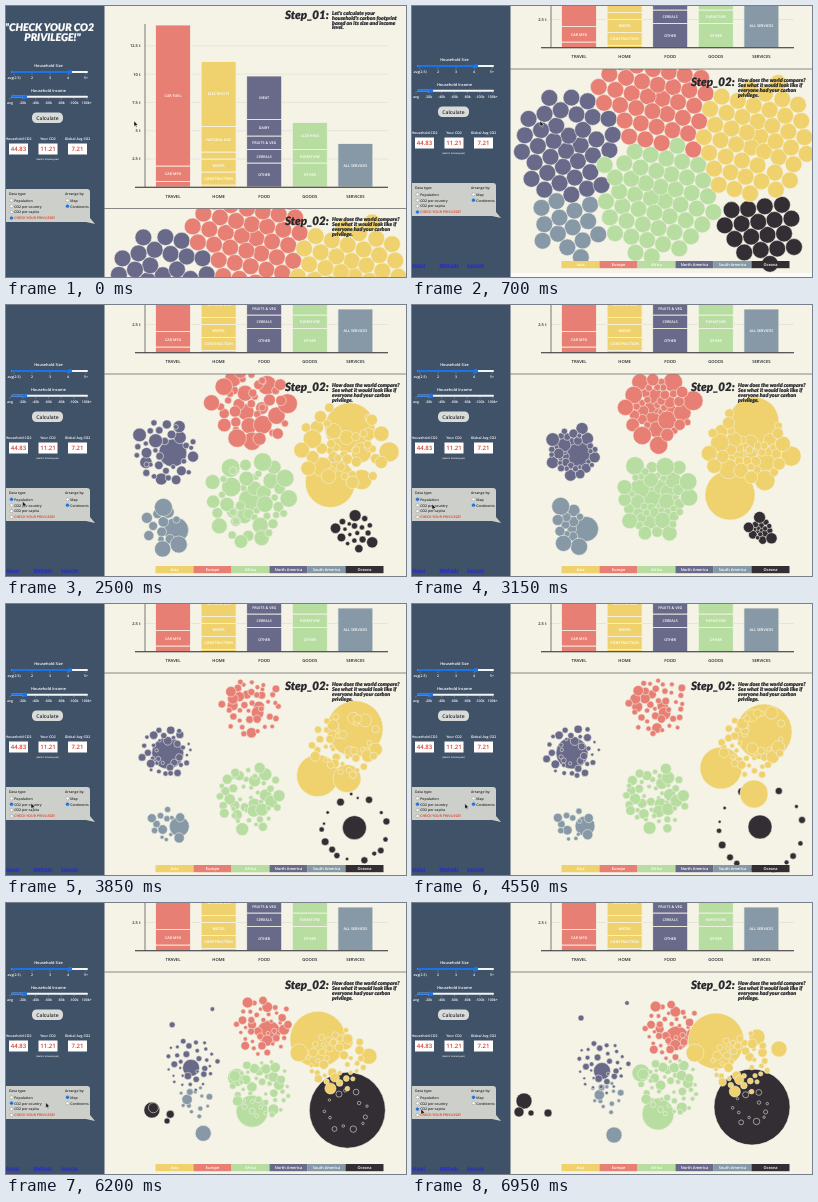
Recreate the animation shown at these times as an HTML page. Size 400 by 271 pixels, loop 7 s.

```html
<!DOCTYPE html>
<html lang="en">
<head>
<meta charset="utf-8">
<title>Carbon footprint explorer</title>
<style>
html, body { margin: 0; width: 100%; height: 100%; overflow: hidden; background: #fbfbf8; }
svg { display: block; width: 100vw; height: 100vh; }
text { font-family: "Open Sans", "Noto Sans", sans-serif; font-weight: 600; text-rendering: geometricPrecision; }
.brush { font-family: Lato, "Open Sans", sans-serif; font-weight: 900; font-style: italic; stroke: currentColor; stroke-width: .2; }
</style>
</head>
<body>
<svg id="stage" viewBox="0 0 400 271" preserveAspectRatio="none">
  <clipPath id="worldClip"><rect x="98" y="69" width="302" height="204"/></clipPath>
  <g id="page">
    <rect x="98" width="302" height="273" fill="#f4f3e6"/>
    <rect width="98.5" height="290" fill="#405268"/>
    <g id="side"></g>
    <g id="scroll">
      <g id="title" color="#fff"></g>
      <g id="chart" color="#26262c"></g>
      <g id="world" color="#26262c" transform="translate(0 133.5)">
        <g id="bubbles" clip-path="url(#worldClip)" stroke="#f4f3e6" stroke-width=".55"></g>
      </g>
    </g>
  </g>
  <path id="cursor" d="M0 0V5.4L1.3 4.3L2.2 6.2L3 5.8L2.2 4H4Z" fill="#111" stroke="#fff" stroke-width=".4"/>
</svg>
<script>
const LOOP = 7000, SCROLL = 133.5, BOUNCE = 6;
const YELLOW = '#efd26d', RED = '#e87f74', GREEN = '#b7dda1',
      PURPLE = '#69698a', SLATE = '#8799a7', BLACK = '#332d34',
      INK = '#26262c', BLUE = '#1a73e8', CREAM = '#f4f3e6';
const $ = id => document.getElementById(id);

function add(parent, tag, attrs, content) {
  const el = document.createElementNS('http://www.w3.org/2000/svg', tag);
  for (const k in attrs) el.setAttribute(k, attrs[k]);
  if (content !== undefined) el.textContent = content;
  parent.appendChild(el);
  return el;
}
const rect = (p, x, y, width, height, fill, more) => add(p, 'rect', { x, y, width, height, fill, ...more });
const dot = (p, cx, cy, r, fill, more) => add(p, 'circle', { cx, cy, r, fill, ...more });
const line = (p, x1, y1, x2, y2, stroke, w) => add(p, 'line', { x1, y1, x2, y2, stroke, 'stroke-width': w });
const text = (p, x, y, size, fill, str, more) =>
  add(p, 'text', { x, y, 'font-size': size, fill, 'text-anchor': 'middle', ...more }, str);
const LEFT = { 'text-anchor': 'start' }, BRUSH = { class: 'brush' };

// Sidebar
const side = $('side'), radios = {};

function slider(label, y, value, ticks, x0, gap) {
  text(side, 42.5, y, 3.9, '#fff', label);
  rect(side, 5, y + 3.7, 77, 2, '#f2f4f5', { rx: 1 });
  rect(side, 5, y + 3.7, value - 5, 2, BLUE, { rx: 1 });
  dot(side, value, y + 4.7, 2.2, BLUE);
  ticks.forEach((s, i) => {
    const x = x0 + i * gap;
    line(side, x, y + 6.2, x, y + 7.4, '#d5dae0', .4);
    text(side, x, y + 12, 3.5, '#fff', s);
  });
}
function radioList(x, y, options) {
  Object.entries(options).forEach(([key, label], i) => {
    const cy = y + i * 5.9;
    dot(side, x, cy, 1.6, '#fff', { stroke: '#777', 'stroke-width': .4 });
    radios[key] = dot(side, x, cy, 1.6, BLUE);
    text(side, x + 2.7, cy + 1.3, 3.5, key === 'privilege' ? '#e03a28' : INK, label, LEFT);
  });
}
function buildSide() {
  slider('Household Size', 61.3, 64, ['avg(2.5)', '2', '3', '4', '5+'], 8, 18);
  slider('Household Income', 86, 19, ['avg', '-20k', '-40k', '-60k', '-80k', '-100k', '100k+'], 4, 12.8);
  rect(side, 26, 106.5, 31, 10.5, '#d9dbd9', { rx: 4.5 });
  text(side, 41.5, 113.7, 5, INK, 'Calculate', { 'font-weight': 400 });
  [['Household CO2', '44.83'], ['Your CO2', '11.21'], ['Global Avg CO2', '7.21']].forEach(([label, value], i) => {
    const x = 12.5 + i * 29.5;
    text(side, x, 134.3, 3.5, '#fff', label);
    rect(side, x - 9.5, 137.5, 19, 11, '#fff');
    text(side, x, 145.3, 6, '#d8402f', value);
  });
  text(side, 41.5, 154, 2.3, '#fff', '(metric tonnes/year)');
  add(side, 'path', { fill: '#cdd0ca', d: 'M0 183H81Q84 183 84 186V212L89 218L80 216H0Z' });
  text(side, 3, 189.3, 3.5, INK, 'Data type:', LEFT);
  text(side, 59, 189.3, 3.5, INK, 'Arrange by:', LEFT);
  radioList(5.5, 194.3, {
    population: 'Population', country: 'CO2 per country', capita: 'CO2 per capita', privilege: 'CHECK YOUR PRIVILEGE!'
  });
  radioList(61.5, 194.3, { map: 'Map', continents: 'Continents' });
}

// Heading, bar chart, second section
function step(parent, y, name, lines) {
  text(parent, 279, y, 11.6, INK, name, { ...LEFT, ...BRUSH });
  lines.forEach((s, i) => text(parent, 326, y - 4.2 + i * 4.9, 5.3, INK, s, { ...LEFT, ...BRUSH }));
}
// Parts are heights from the baseline up
function bar(parent, x, name, fill, parts) {
  let y = 181;
  for (const [label, h] of parts) {
    y -= h;
    rect(parent, x, y, 35, h, fill, { stroke: CREAM, 'stroke-width': .8 });
    text(parent, x + 17.5, y + h / 2 + 1.4, 3.7, '#fff', label);
  }
  text(parent, x + 17.5, 191.8, 4.2, INK, name);
}
function buildMain() {
  const title = $('title'), chart = $('chart'), world = $('world');
  text(title, 43.5, 25.5, 10.5, '#fff', '"CHECK YOUR CO2', BRUSH);
  text(title, 46.5, 35, 10.5, '#fff', 'PRIVILEGE!"', BRUSH);

  for (let i = 1; i <= 5; i++) {
    const y = 181.3 - i * 28.3;
    line(chart, 139, y, 382, y, '#d4d4cb', .5);
    text(chart, 134.5, y + 1.5, 4, INK, i * 2.5 + ' t', { 'text-anchor': 'end' });
  }
  line(chart, 139, 18, 139, 181, INK, .6);
  [
    ['TRAVEL', RED, [['', 5.5], ['CAR MFG', 15.5], ['CAR FUEL', 141]]],
    ['HOME', YELLOW, [['', 2], ['CONSTRUCTION', 13], ['WATER', 13], ['', 7], ['NATURAL GAS', 25.5], ['ELECTRICITY', 65]]],
    ['FOOD', PURPLE, [['OTHER', 24], ['CEREALS', 13.5], ['FRUITS & VEG', 13.5], ['DAIRY', 16.5], ['MEAT', 43.5]]],
    ['GOODS', GREEN, [['OTHER', 24], ['FURNITURE', 13.5], ['CLOTHING', 27]]],
    ['SERVICES', SLATE, [['ALL SERVICES', 43.5]]]
  ].forEach(([name, fill, parts], i) => bar(chart, 149.5 + i * 45.6, name, fill, parts));
  line(chart, 129, 181.2, 382, 181.2, INK, 1.1);
  step(chart, 13, 'Step_01:', ["Let's calculate your", "household's carbon footprint", 'based on its size and income', 'level.']);

  line(world, 98, 69, 400, 69, '#6a6c70', .8);
  step(world, 86, 'Step_02:', ['How does the world compare?', 'See what it would look like if', 'everyone had your carbon', 'privilege.']);
  Object.entries({ Asia: YELLOW, Europe: RED, Africa: GREEN, 'North America': PURPLE, 'South America': SLATE, Oceana: BLACK })
    .forEach(([name, fill], i) => {
      rect(world, 149.5 + i * 38, 261, 38, 7.2, fill);
      text(world, 168.5 + i * 38, 266, 3.9, '#fff', name);
    });
  ['About', 'Methods', 'Sources'].forEach((s, i) =>
    text(world, i * 27.5, 266.5, 4.5, '#1c22e6', s, { ...LEFT, 'text-decoration': 'underline' }));
}

// Bubbles: n countries around a centre; size is the largest common radius,
// hubs are the few outstanding circles [x, y, r] of a layout
const groups = [
  { fill: BLACK, n: 18, size: 6, home: [349, 225], map: [340, 204], orbit: 42, hubs: {
    country: [[348, 223, 12]],
    map: [[340, 204, 38], [112, 198, 8], [107, 209, 5], [119, 210, 3], [136, 210, 4]] } },
  { fill: SLATE, n: 14, size: 9, home: [160, 222], map: [194, 193], hubs: {
    population: [[174, 224, 12.5]], country: [[173, 222, 10]], map: [[202, 232, 8]] } },
  { fill: PURPLE, n: 36, size: 7, home: [161, 148], map: [190, 163], hubs: {
    population: [[166, 149, 14]], country: [[160, 149, 16]], map: [[190, 168, 8.5], [169, 115, 3], [215, 100, 2.3]] } },
  { fill: GREEN, n: 47, size: 10, home: [243, 194], map: [258, 184], hubs: {
    population: [[241, 193, 12]], map: [[246, 211, 16], [229, 170, 9]] } },
  { fill: RED, n: 42, size: 10, home: [246, 102], map: [259, 128], hubs: { map: [[265, 135, 12]] } },
  { fill: YELLOW, n: 46, size: 10.5, home: [338, 141], map: [328, 160], hubs: {
    population: [[342, 117, 25], [318, 190, 25]],
    country: [[352, 128, 28], [309, 164, 21], [342, 190, 14]],
    map: [[304, 138, 28], [345, 134, 8], [367, 146, 8], [283, 150, 9]] } }
];
// spread: start radius as a share of the packed one; pull and tight steer the packing
const layouts = {
  privilege: { spread: 1, pull: .008, tight: 1 },
  population: { spread: .65, scale: 1, pull: .03, tight: .9 },
  country: { spread: .52, scale: .65, pull: 0, tight: .6 },
  map: { spread: .5, scale: .58 }
};
const SPACING = 8.7, RADIUS = 8.4, GOLDEN = Math.PI * (3 - Math.sqrt(5));

function seeded(seed) {
  return () => (seed = (seed * 16807) % 2147483647) / 2147483647;
}
// Sunflower pattern, so that each country keeps its direction in all layouts
function scatter(group, name, rand) {
  const { spread, scale } = layouts[name], anchor = name === 'map' ? group.map : group.home;
  return Array.from({ length: group.n }, (_, i) => {
    const hub = group.hubs[name]?.[i], share = rand();
    if (hub) return { x: hub[0], y: hub[1], r: hub[2], fixed: true };
    const orbit = name === 'country' && group.orbit;
    const d = orbit || SPACING * Math.sqrt(i + .5) * spread + (rand() - .5) * 5;
    return {
      x: anchor[0] + d * Math.cos(i * GOLDEN), y: anchor[1] + d * Math.sin(i * GOLDEN), anchor,
      r: scale ? group.size * scale * (.35 + .65 * share ** 2) : RADIUS
    };
  });
}
// Draws circles to their anchors and pushes overlapping ones apart
function settle(nodes, { pull, tight }) {
  if (!tight) return;
  for (let n = 0; n < 120; n++) {
    for (const a of nodes) if (!a.fixed) {
      a.x += (a.anchor[0] - a.x) * pull;
      a.y += (a.anchor[1] - a.y) * pull;
    }
    nodes.forEach((a, i) => {
      for (let j = i + 1; j < nodes.length; j++) {
        const b = nodes[j], dx = b.x - a.x, dy = b.y - a.y;
        const d = Math.hypot(dx, dy) || .01, gap = (a.r + b.r) * tight - d;
        if (gap <= 0) continue;
        const k = gap / d * .45;
        if (!a.fixed) { a.x -= dx * k; a.y -= dy * k; }
        if (!b.fixed) { b.x += dx * k; b.y += dy * k; }
      }
    });
  }
}
function buildBubbles() {
  const rand = seeded(911), poses = {};
  for (const name in layouts) {
    poses[name] = groups.flatMap(g => scatter(g, name, rand));
    settle(poses[name], layouts[name]);
  }
  const circles = groups.flatMap(g => Array.from({ length: g.n }, () => dot($('bubbles'), 0, 0, 0, g.fill)));
  return { poses, circles };
}

// Motion
const easeOut = p => 1 - (1 - p) ** 2, smooth = p => p * p * (3 - 2 * p);
const span = (t, a, b) => Math.min(1, Math.max(0, (t - a) / (b - a)));
const mix = (a, b, p) => a + (b - a) * p;

const moves = [
  { from: 'privilege', to: 'population', start: 2000, time: 1100 },
  { from: 'population', to: 'country', start: 3300, time: 1200 },
  { from: 'country', to: 'map', start: 5250, time: 1600 }
];
const GLIDE = 800;
const stops = [[0, 128, 115], [1750, 15, 195], [3000, 20, 199], [4450, 52, 200], [5200, 61, 195], [6650, 9, 206]];

buildSide();
buildMain();
const { poses, circles } = buildBubbles();

function drawScroll(t) {
  const way = (SCROLL + BOUNCE) * smooth(span(t, 0, 620));
  const over = Math.max(0, way - SCROLL) * (1 - smooth(span(t, 760, 1300)));
  $('scroll').setAttribute('transform', `translate(0 ${-Math.min(SCROLL, way)})`);
  $('page').setAttribute('transform', `translate(0 ${-over})`);
}
function drawBubbles(t) {
  const { from, to, start, time } = moves.findLast(m => t >= m.start) || moves[0];
  const shift = easeOut(span(t, start, start + time)), grow = easeOut(span(t, start, start + time * .4));
  circles.forEach((el, i) => {
    const a = poses[from][i], b = poses[to][i];
    el.setAttribute('cx', mix(a.x, b.x, shift));
    el.setAttribute('cy', mix(a.y, b.y, shift));
    el.setAttribute('r', mix(a.r, b.r, grow));
  });
}
function drawControls(t) {
  const data = t < 2000 ? 'privilege' : t < 3300 ? 'population' : t < 6750 ? 'country' : 'capita';
  const order = t < 5250 ? 'continents' : 'map';
  for (const key in radios) radios[key].setAttribute('visibility', key === data || key === order ? 'visible' : 'hidden');

  let [, x, y] = stops[0];
  for (const [at, sx, sy] of stops) {
    const p = smooth(span(t, at - GLIDE, at));
    x = mix(x, sx, p);
    y = mix(y, sy, p);
  }
  $('cursor').setAttribute('transform', `translate(${x} ${y})`);
}
const begin = performance.now();
function tick() {
  const t = (performance.now() - begin) % LOOP;
  drawScroll(t);
  drawBubbles(t);
  drawControls(t);
  requestAnimationFrame(tick);
}
tick();
</script>
</body>
</html>
```
